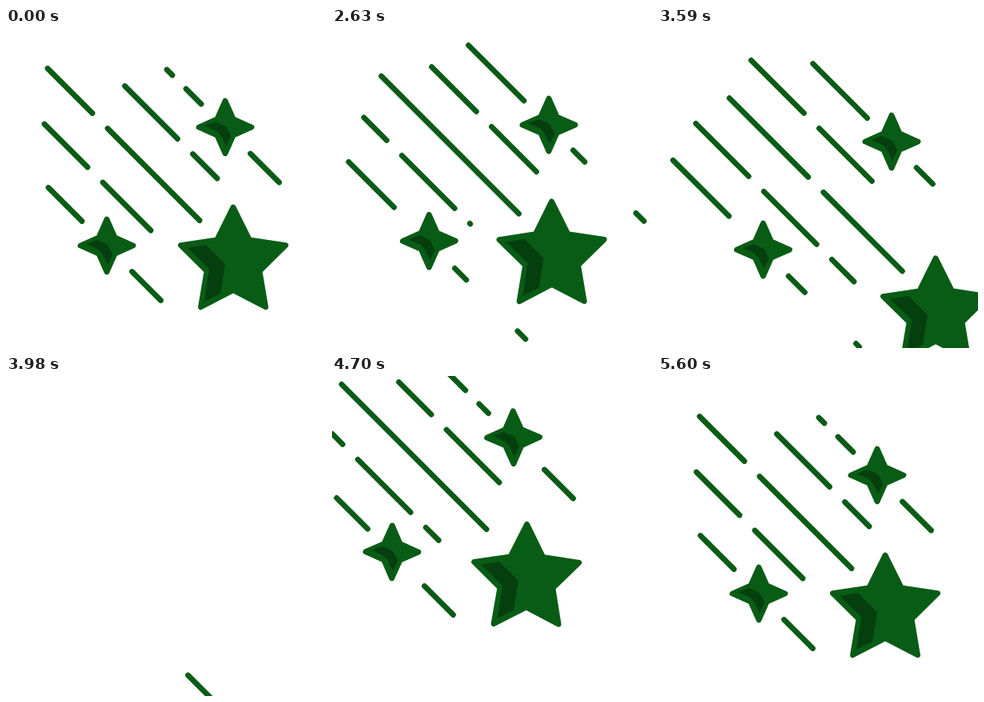
Recreate the animation shown at these times as an HTML page with a canvas. Size 400x400 px, loop 5.63 s.

```html
<!DOCTYPE html>
<html lang="en">
<head>
<meta charset="utf-8">
<title>Shooting stars</title>
<style>
  html, body { margin: 0; width: 100%; height: 100%; overflow: hidden; background: #fff; }
  canvas { display: block; width: 400px; height: 400px; }
</style>
</head>
<body>
<canvas id="stage" width="400" height="400"></canvas>
<script>
const ctx = document.getElementById('stage').getContext('2d');
const GREEN = '#095c15', DARK = '#063f0e';

// Seconds; the moving part is measured from the end of the rest.
const LOOP = 5.63, REST = 2, MOVE = 3.6, LAUNCH = 1.14, SWAP = 2;

const { PI, sin, cos, exp, abs, min, max } = Math;
const clamp = v => min(1, max(0, v));
const smooth = v => clamp(v) ** 2 * (3 - 2 * clamp(v));

// Monotone cubic through a few [time, value] points.
function curve(points) {
  const slope = i => (points[i + 1][1] - points[i][1]) / (points[i + 1][0] - points[i][0]);
  const last = points.length - 1;
  const tangent = i => i === 0 || i === last ? slope(max(0, i - 1))
    : 2 / (1 / slope(i - 1) + 1 / slope(i));
  return t => {
    if (t <= points[0][0]) return points[0][1];
    if (t >= points[last][0]) return points[last][1];
    const i = points.findIndex(p => p[0] > t) - 1;
    const [[t0, v0], [t1, v1]] = points.slice(i, i + 2);
    const h = t1 - t0, u = (t - t0) / h, w = 1 - u;
    return v0 * (1 + 2 * u) * w * w + v1 * u * u * (3 - 2 * u)
         + h * u * w * (tangent(i) * w - tangent(i + 1) * u);
  };
}

// Share of the dash travel completed.
const flow = curve([[0, 0], [1.14, .091], [1.59, .231], [2.34, .63], [3.15, .928], [MOVE, 1]]);

// Pull back, shoot out to the lower right, then settle in from the upper left.
const flight = (pull, delay, reach) => t => {
  if (t < SWAP) {
    return 850 * max(0, t - LAUNCH - delay) ** 3 - pull * smooth(t / LAUNCH);
  }
  const decay = time => exp(2.9 * (2.34 - time));
  return -reach * (decay(min(t, MOVE)) - decay(MOVE)) / (1 - decay(MOVE));
};
const flyBig = flight(14.6, 0, 120);
const flyRight = flight(7, .144, 145);
const flyLeft = flight(7, .205, 151);

// How far the tail end lags behind.
const tailLag = t => 40 * sin(PI * clamp(t / MOVE) ** .8);
const burstLag = size => t => size * exp(-(((t - 1.72) / .35) ** 2));

// Dashes on the line y = x - diag, clipped to [from, to].
function dashes(diag, from, to, first, dash, period) {
  let x = first + Math.floor((from - first) / period) * period;
  ctx.beginPath();
  for (; x < to; x += period) {
    const a = max(x, from), b = min(x + dash, to);
    if (b - a < .5) continue;
    ctx.moveTo(a, a - diag);
    ctx.lineTo(b, b - diag);
  }
  ctx.stroke();
}

const smallTail = { dash: 83, gap: 17, cycles: 10, gain: .95, lag: tailLag };
const sideTrail = { dash: 66, gap: 19, cycles: 7, gain: 1 };
const trails = [
  { ...smallTail, diag: 149, from: 201, to: 244, phase: -19, fly: flyRight },
  { ...smallTail, diag: -146.5, from: 53, to: 95, phase: -46, fly: flyLeft },
  { ...sideTrail, diag: 76, from: 133, to: 264, phase: -115.5,
    fly: flight(14.6, .105, 148), lag: burstLag(46) },
  { ...sideTrail, diag: -72, from: 48, to: 181, phase: -60,
    fly: flight(14, 0, 143), lag: burstLag(80) },
  { dash: 216, gap: 19, cycles: 3, gain: .8, diag: 1.5, from: 52, to: 242, phase: -115,
    fly: flyBig, lag: burstLag(30) }
];

function drawTrail(o, t) {
  const d = o.fly(t), end = o.to + d, period = o.dash + o.gap;
  const first = end + o.phase - flow(t) ** o.gain * o.cycles * period;
  dashes(o.diag, o.from + d - o.lag(t), end, first, o.dash, period);
}

function starPoints(tips, outer, inner) {
  return Array.from({ length: tips * 2 }, (_, i) => {
    const r = i % 2 ? inner : outer, a = i * PI / tips;
    return [r * sin(a), -r * cos(a)];
  });
}

const bigShape = {
  body: starPoints(5, 69, 34.7),
  facet: [[-57, -18], [-34, -22], [-10, 2], [-16, 39], [-36, 49], [-30, 8]]
};
const smallShape = {
  body: starPoints(4, 33, 14.3),
  facet: [[-26, -2], [-12, -7], [1, -1], [7.5, 11], [1, 24], [-5, 11], [-11, 4.5]]
};
const stars = [
  { shape: bigShape, x: 284, y: 293, fly: flyBig, shake: [-1.7, 2.4], tilt: -1.9 },
  { shape: smallShape, x: 274, y: 124, fly: flyRight, shake: [2.1, 2.3], tilt: 2.3, diag: 148.5 },
  { shape: smallShape, x: 126, y: 272, fly: flyLeft, shake: [-1.1, -3.3], tilt: -1.9, diag: -147 }
];

function fillPolygon(points, color) {
  ctx.beginPath();
  points.forEach(p => ctx.lineTo(...p));
  ctx.closePath();
  ctx.fillStyle = color;
  ctx.fill();
}

function drawStar(s, t) {
  const level = abs(cos(PI * t / MOVE)) * clamp(t / .03) * clamp(3 * (MOVE - t));
  const swing = hertz => level * cos(2 * PI * hertz * (t - .03));
  const d = s.fly(t), sway = swing(6.41);
  ctx.save();
  ctx.translate(s.x + d + s.shake[0] * sway, s.y + d + s.shake[1] * sway);
  ctx.rotate(s.tilt * swing(6.25) * PI / 180);
  fillPolygon(s.shape.body, GREEN);
  ctx.stroke();
  fillPolygon(s.shape.facet, DARK);
  ctx.restore();
}

// Single dashes running ahead of a small star.
function drawAhead(s, t) {
  const x = s.x + s.fly(t), near = x + 31.5;
  dashes(s.diag, near, x + 120, near - 500 * flow(t), 36, 100);
}

function draw(seconds) {
  const t = max(0, seconds % LOOP - REST);
  ctx.fillStyle = '#fff';
  ctx.fillRect(0, 0, 400, 400);
  ctx.strokeStyle = GREEN;
  ctx.lineWidth = 6.8;
  ctx.lineCap = ctx.lineJoin = 'round';
  trails.forEach(o => drawTrail(o, t));
  stars.filter(s => s.diag).forEach(s => drawAhead(s, t));
  stars.forEach(s => drawStar(s, t));
}

const begin = performance.now();
function tick() {
  draw((performance.now() - begin) / 1000);
  requestAnimationFrame(tick);
}
tick();
</script>
</body>
</html>
```
